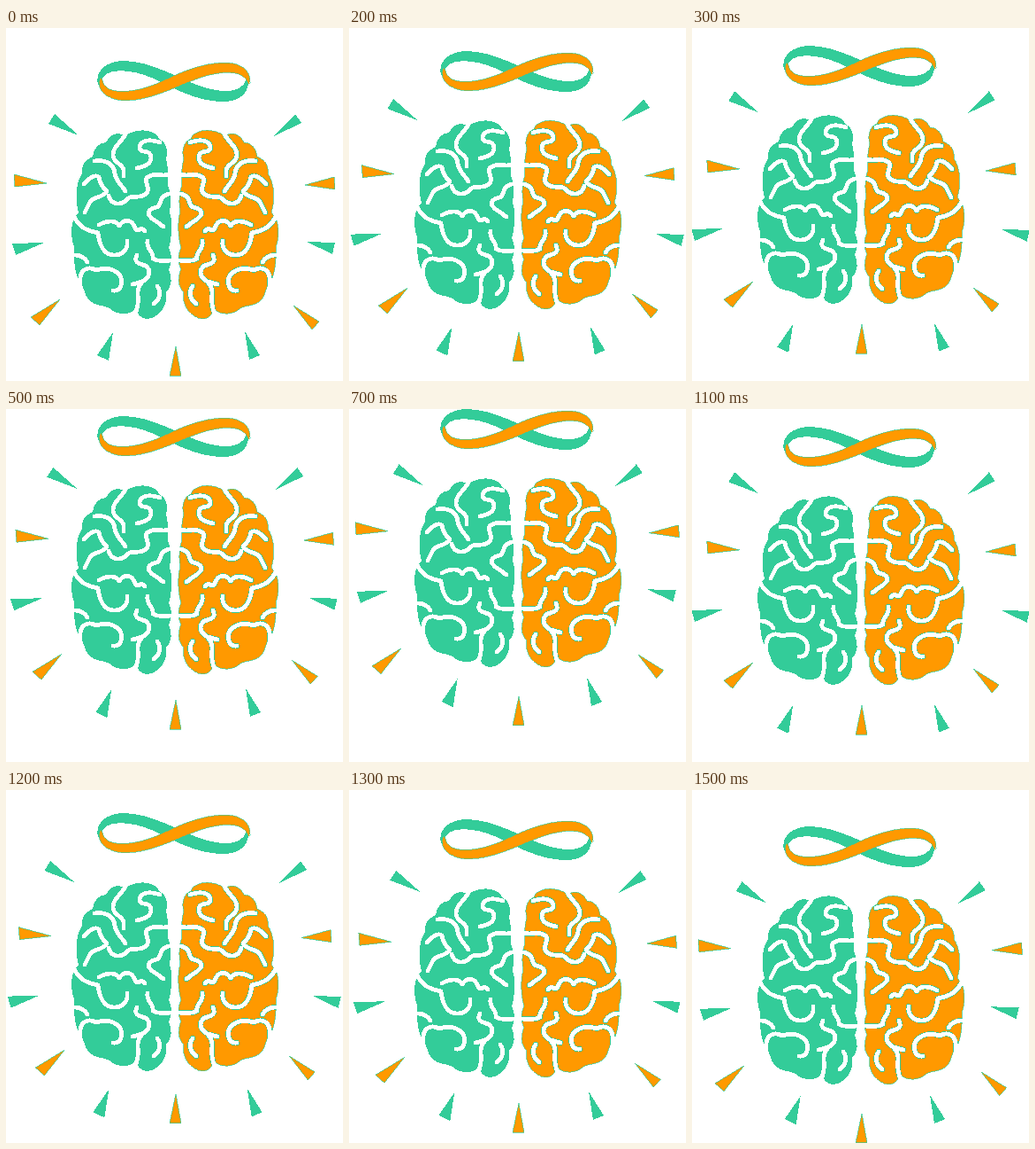
An HTML page for the animation above (1600 ms loop, 381 px wide and 398 px high).

```html
<!DOCTYPE html>
<html lang="en">
<head>
<meta charset="utf-8">
<title>Brain and ribbon</title>
<style>
  html, body { margin: 0; width: 100%; height: 100%; overflow: hidden; background: #fff; }
  svg { display: block; width: 381px; height: 398px; shape-rendering: crispEdges; }
  .green { fill: #3c9; }
  .orange { fill: #f90; stroke: #3c9; stroke-width: .7; }
  .grooves { fill: none; stroke: #fff; stroke-width: 4.8; stroke-linecap: round; stroke-linejoin: round; }
  .rim { stroke: #3c9; stroke-width: 6; }
</style>
</head>
<body>
<svg viewBox="0 0 381 398">
  <defs>
    <path id="band" d="M106 66C99 50 114 37 134 37C165 37 198 58 222 66C245 73 268 75 273 57L275 60
      C275 76 262 83 246 83C218 83 190 68 168 57C140 45 110 44 108 62Z"/>
    <path id="half" d="M134 122C130 117 118 118 113 129C104 129 99 137 98 145C88 149 85 156 86 164
      C79 174 77 192 82 208L77 215C73 222 73 238 77 247C76 260 78 280 84 287C88 290 88 300 93 306
      C100 314 110 312 117 316C125 324 140 324 146 317L149 321C152 329 164 330 170 324
      C180 318 183 305 181 298C188 292 188 280 184 272C188 264 188 255 184 248
      C188 235 188 215 185 208C187 195 186 185 183 177C184 165 183 155 181 148
      C184 138 181 128 173 125C170 115 150 111 134 122Z"/>
    <clipPath id="inside"><use href="#half"/></clipPath>
    <g id="folds">
      <path d="M136 117C133 128 120 133 121 144C122 153 131 152 133 160L133 167"/>
      <path d="M174 129C160 124 150 128 151 136C153 142 163 136 164 146C164 154 156 156 148 158"/>
      <path d="M100 150C114 148 122 154 123 164C124 172 130 176 135 184"/>
      <path d="M88 176C95 168 101 165 105 168C106 176 110 180 114 184C110 192 96 190 94 198L89 208"/>
      <path d="M116 189C119 200 130 200 136 194C143 186 150 194 158 187C166 180 152 172 162 167C170 163 176 168 185 165"/>
      <path d="M184 187C170 191 178 200 170 202C156 206 161 212 168 217C174 220 174 222 178 224"/>
      <path d="M105 222C114 217 124 216 128 223C134 214 143 216 146 226C150 232 152 222 157 229"/>
      <path d="M76 210C82 226 94 229 104 231C106 248 113 257 124 256C134 255 138 248 137 240"/>
      <path d="M78 256C84 256 89 259 92 264"/>
      <path d="M84 289C82 272 92 268 102 273C116 268 130 274 131 286C130 294 126 297 121 296"/>
      <path d="M148 256C144 264 150 266 158 268C165 274 162 282 154 286L143 289"/>
      <path d="M160 240C158 250 168 252 166 260C172 264 180 262 188 262"/>
      <path d="M171 291C176 298 174 306 167 311"/>
      <path d="M146 322C154 306 144 298 153 288"/>
    </g>
  </defs>
  <g id="scene">
    <use href="#band" class="green" x="-1"/>
    <use href="#band" class="orange" transform="matrix(1 0 0 -.93 1 116.3)"/>
    <use href="#half" class="green"/>
    <use href="#folds" class="grooves"/>
    <g transform="matrix(-1 0 0 1 382 0)">
      <use href="#half" class="orange"/>
      <g clip-path="url(#inside)"><use href="#folds" class="grooves rim"/></g>
      <use href="#folds" class="grooves"/>
    </g>
  </g>
</svg>
<script>
  const scene = document.getElementById('scene');

  // colour, triangle, drift at full spread
  const rays = [
    ['green', '82,121 48,108 55,97', -7, -9],
    ['green', '303,122 327,97 334,107', 9, -9],
    ['orange', '46,175 9,165 10,179', 8, 1],
    ['orange', '338,177 371,168 372,182', -6, 1],
    ['green', '43,242 7,243 11,256', -8, 1],
    ['green', '340,241 372,242 369,255', 10, 3],
    ['orange', '61,306 28,326 38,335', 8, -3],
    ['orange', '325,313 354,331 346,340', -7, -3],
    ['green', '121,343 103,369 116,375', -7, 8],
    ['green', '270,342 275,374 287,369', 4, 8],
    ['orange', '192,359 185,392 198,392', 0, -8]
  ].map(([color, points, dx, dy]) => {
    const el = document.createElementNS('http://www.w3.org/2000/svg', 'polygon');
    el.setAttribute('class', color);
    el.setAttribute('points', points);
    scene.append(el);
    return { el, dx, dy };
  });

  const STEP = 100, STEPS = 16, TOP_STEP = 7, REST = 37;
  const heights = [0, 4, 8, 15, 20, 26, 33, 37, 41];

  const move = (el, x, y) => el.setAttribute('transform', `translate(${x} ${y})`);

  function draw(now) {
    const step = Math.floor(now / STEP) % STEPS;
    const y = heights[Math.abs(step - TOP_STEP)];
    // rays spread most when the scene passes mid-height
    const spread = 1 - Math.abs(y - 20.5) / 16.5;
    move(scene, 0, y - REST);
    for (const { el, dx, dy } of rays) move(el, dx * spread, dy * spread);
    requestAnimationFrame(draw);
  }
  draw(0);
</script>
</body>
</html>
```
